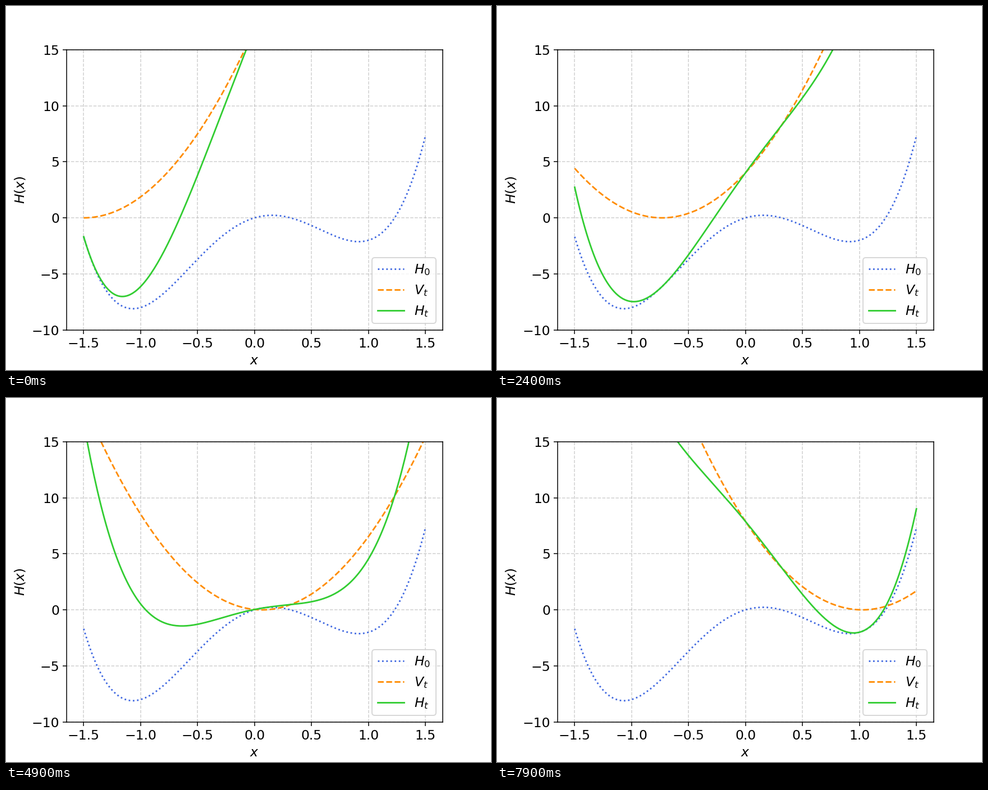
A matplotlib script that plays this animation: 864 by 648 pixels, repeating every 8000 ms.

```python
import numpy as np
import matplotlib.pyplot as plt
from matplotlib.animation import FuncAnimation

FRAMES = 80
INTERVAL = 100
STIFFNESS = 15.0
START = -1.5
STEP = 0.03196

plt.rcParams.update({"font.size": 12.5, "font.family": "DejaVu Sans"})


def potential(x):
    return 5 * x**4 - 10 * x**2 + 3 * x


def trap(x, center):
    return 0.5 * STIFFNESS * (x - center) ** 2


x = np.linspace(-1.5, 1.5, 200)
h0 = potential(x)

fig, ax = plt.subplots(figsize=(6.4, 4.8), dpi=135)
ax.plot(x, h0, ":", color="royalblue", label="$H_0$")
trap_line, = ax.plot(x, trap(x, START), "--", color="darkorange", label="$V_t$")
total_line, = ax.plot(x, h0 + trap(x, START), color="limegreen", label="$H_t$")

ax.set_xlim(-1.65, 1.65)
ax.set_ylim(-10, 15)
ax.set_xlabel("$x$")
ax.set_ylabel("$H(x)$")
ax.grid(True, linestyle="--", alpha=0.6)
ax.legend(loc="lower right")


def update(frame):
    v = trap(x, START + STEP * frame)
    trap_line.set_ydata(v)
    total_line.set_ydata(h0 + v)
    return trap_line, total_line


anim = FuncAnimation(fig, update, frames=FRAMES, interval=INTERVAL,
                     repeat=True, repeat_delay=0)
plt.show()
```
